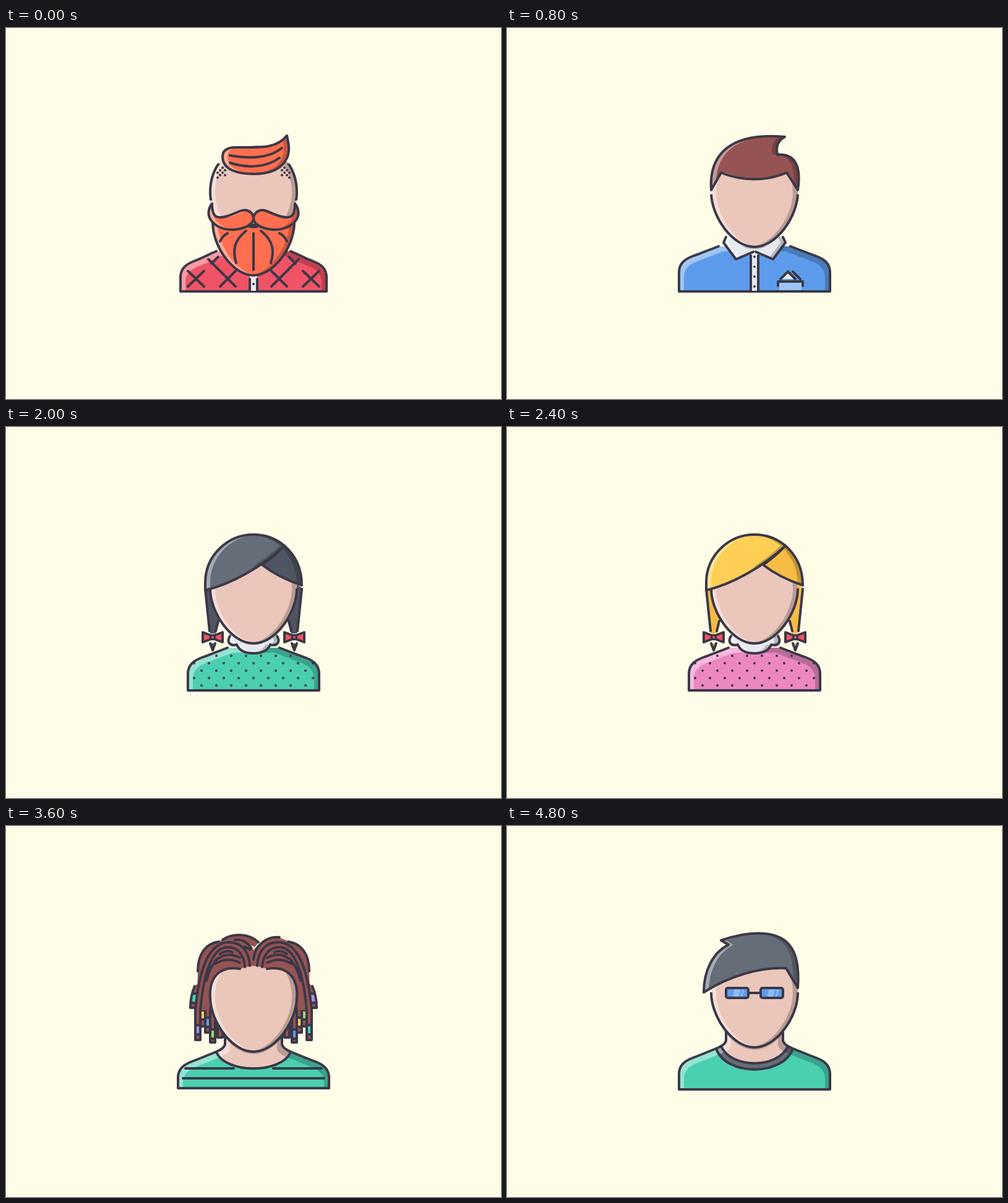
Recreate the animation shown at these times as an HTML page with a canvas. Size 800 by 600 pixels, loop 5000 ms.

```html
<!DOCTYPE html>
<html lang="en">
<head>
<meta charset="utf-8">
<title>Avatars</title>
<style>
  html, body { margin: 0; width: 100%; height: 100%; overflow: hidden; background: #fffde8; }
  canvas { display: block; }
</style>
</head>
<body>
<canvas id="stage" width="800" height="600"></canvas>
<script>
const ctx = document.getElementById('stage').getContext('2d');
const ink = '#3b3847', skin = '#eac6bb', white = '#e6e9ed', orange = '#ff6e4f',
  red = '#f15366', brown = '#965353', blue = '#5d9cec', yellow = '#ffce54',
  amber = '#f6bb42', mint = '#4acfb0', pink = '#ec87c0', grey = '#656d78',
  lilac = '#ac92ec', green = '#a0d468';

// ---- helpers; x = 0 is the vertical axis of the figure ----
const path = d => typeof d === 'string' ? new Path2D(d) : d;

function fill(d, color) {
  ctx.fillStyle = color;
  ctx.fill(path(d));
}

function line(d, width = 4, color = ink) {
  ctx.lineWidth = width;
  ctx.strokeStyle = color;
  ctx.stroke(path(d));
}

function dot(x, y, r = 2, color = ink) {
  ctx.beginPath();
  ctx.arc(x, y, r, 0, 7);
  ctx.fillStyle = color;
  ctx.fill();
}

function within(clip, draw) {
  ctx.save();
  ctx.clip(path(clip));
  draw();
  ctx.restore();
}

function both(draw) {
  for (const side of [1, -1]) {
    ctx.save();
    ctx.scale(side, 1);
    draw(side);
    ctx.restore();
  }
}

function twin(d) {
  const p = new Path2D(d);
  p.addPath(new Path2D(d), new DOMMatrix([-1, 0, 0, 1, 0, 0]));
  return p;
}

// Light rim on the left half, dark rim on the right half
function shade(p, dy = 0) {
  within(p, () => {
    for (const [side, color] of [[-1, 'rgba(255,255,255,.42)'], [1, 'rgba(0,0,0,.21)']]) {
      const rim = new Path2D('M-400 0H400V600H-400Z');
      rim.addPath(p, new DOMMatrix([1, 0, 0, 1, -8 * side, dy]));
      within(`M0 0H${400 * side}V600H0Z`, () => {
        ctx.fillStyle = color;
        ctx.fill(rim, 'evenodd');
      });
    }
  });
}

function shape(d, color, outline = d) {
  const p = path(d);
  fill(p, color);
  shade(p);
  line(outline);
}

// ---- shared parts ----
let torso;

function body(w, y, bottom, neck, color, open, paint = () => {}) {
  const n = neck + 14;
  const left = (open ? `M${-n} ${y - 42}`
    : `M${-neck} ${y - 75}V${y - 55}Q${-neck} ${y - 48} ${-n} ${y - 42}`) +
    `C${-n - 16} ${y - 35.6} ${38 - w} ${y - 32} ${22 - w} ${y - 26}` +
    `C${9 - w} ${y - 21} ${-w} ${y - 14} ${-w} ${y}`;
  const right = `V${y}C${w} ${y - 14} ${w - 9} ${y - 21} ${w - 22} ${y - 26}` +
    `C${w - 38} ${y - 32} ${n + 16} ${y - 35.6} ${n} ${y - 42}` +
    (open ? '' : `Q${neck} ${y - 48} ${neck} ${y - 55}V${y - 75}`);
  torso = new Path2D(`${left}V${bottom}H${w}${right}`);
  within(torso, () => {
    fill(torso, color);
    paint();
  });
  shade(torso, 8);
  line(torso);
}

const scoop = (x, y, dip) => `M${-x} ${y}C${16 - x} ${dip} ${x - 16} ${dip} ${x} ${y}`;

function tee(w, y, bottom, neck, color, x, top, dip, trim) {
  const outer = scoop(x, top, dip), inner = scoop(x - 8, top - 4, dip - 12);
  const up = 'V250H-90V350Z';
  body(w, y, bottom, neck, color, false, () => {
    fill(outer + up, trim || skin);
    if (trim) fill(inner + up, skin);
  });
  line(outer);
  if (trim) line(inner);
}

function head(chin, ...spans) {
  const s = chin - 88;
  const p = new Path2D(`M-70 ${s}C-70 ${s - 44} -40 ${s - 76} 0 ${s - 76}S70 ${s - 44} 70 ${s}` +
    `C70 ${s + 38} 36 ${chin} 0 ${chin}S-70 ${s + 38} -70 ${s}Z`);
  within(torso, () => {
    ctx.translate(0, 4);
    fill(p, 'rgba(0,0,0,.18)');
  });
  fill(p, skin);
  shade(p);
  for (const [a, b] of spans) within(`M-200 ${a}H200V${b}H-200Z`, () => line(p));
}

function moustache(dy, color) {
  ctx.save();
  ctx.translate(0, dy);
  shape(twin('M0 306C-3 295 -13 292 -24 297C-38 303 -52 309 -60 305C-66 302 -67 293 -67 284' +
    'C-72 290 -75 300 -70 309C-62 322 -46 327 -31 326C-14 325 1 317 0 306Z'), color);
  ctx.restore();
}

// ---- people ----
function bearded(hair, shirt) {
  body(118, 403, 426, 46, shirt, true);
  both(() => line('M-106 393L-80 418M-80 393L-106 418M-73 374L-29 418M-29 393L-54 418M-57 370L-68 381'));
  fill('M-6 398H6V425H-6Z', white);
  line('M-6 406V425M6 406V425');
  dot(0, 414);
  head(354, [219, 279]);
  both(() => {
    for (const [x, y] of [[50, 226], [54, 230], [46, 230], [58, 234], [50, 234], [54, 238], [46, 238], [58, 242]])
      dot(-x, y);
  });
  const jaw = 'M-66 314C-66 355 -32 400 0 400S66 355 66 314';
  shape(jaw + 'Z', hair, jaw);
  line('M0 332V391');
  both(() => line('M-12 328C-32 344 -34 360 -28 380M-42 332Q-50 336 -54 345'));
  fill('M-6 318L0 311L6 318Z', white);
  shape('M-10 320Q0 316 10 320Q0 324 -10 320Z', '#d6a6d8');
  moustache(0, hair);
  shape('M54 174C57 188 60 202 52 214C42 231 20 236 0 236C-24 236 -50 230 -50 208' +
    'C-50 198 -42 193 -28 193C10 193 36 196 54 174Z', hair);
  line('M-38 206C-5 212 26 210 46 194M-38 218C-10 227 20 226 42 210');
}

function clerk(hair, shirt) {
  body(122, 395, 426, 44, shirt, true);
  fill('M40 412H76V424H40Z', 'rgba(255,255,255,.4)');
  fill('M42 406L54 394L66 406Z', white);
  line('M42 406L54 394L66 406M62 394L74 406M38 417V410H78V417');
  fill('M-6 360H6V425H-6Z', white);
  line('M-6 368V425M6 368V425');
  for (let y = 370; y < 420; y += 16) dot(0, y);
  const collar = twin('M-46 338L-50 347L-30 374L0 360V336Z');
  fill(collar, white);
  shade(collar);
  both(() => line('M-46 338L-50 347L-30 374L-2 362'));
  head(354, [269, 360]);
  shape('M-70 262C-74 205 -40 168 49 176C38 182 34 192 37 205C60 203 77 216 70 262L52 234' +
    'C20 248 -20 248 -54 234Z', hair);
}

function bobbed(hair, shirt, trim) {
  tee(110, 404, 424, 38, shirt, 66, 371, 411, trim);
  head(353, [301, 360]);
  shape('M-54 199C-82 206 -94 236 -84 275C-80 295 -75 310 -70 322C-68 285 -62 250 -42 237Z', hair);
  shape('M-54 199C-36 169 40 165 66 206C90 240 84 290 66 333C64 300 56 233 -8 233' +
    'C-20 233 -32 235 -42 237Z', hair);
}

function braided(hair, dark, dress) {
  body(106, 399, 426, 28, dress, true);
  within(torso, () => {
    for (let row = 0; row < 5; row++)
      for (let x = -108 + row % 2 * 12; x < 110; x += 24) dot(x, 370 + row * 12);
  });
  shape('M-38 338C-44 348 -38 355 -27 352C-23 362 -12 366 0 366S23 362 27 352C38 355 44 348 38 338', white);
  both(() => {
    fill('M-78 260L-70 334H-61L-56 312C-66 298 -70 280 -70 255Z', dark);
    line('M-78 262L-71 330M-57 314L-61 330');
    fill('M-70 350L-66 362L-62 350Z', dark);
    line('M-70 350L-66 361L-62 350');
    const bow = 'M-82 332L-66 338L-50 332V348L-66 342L-82 348Z';
    fill(bow, red);
    line(bow);
    line('M-69 337H-63V343H-69Z');
    dot(-66, 340, 2, red);
  });
  head(350, [261, 356]);
  shape('M50 192C68 208 78 230 78 256C54 248 32 237 14 223C28 213 40 203 50 192Z', dark);
  shape('M-78 264V252C-78 208 -42 174 0 174C20 174 37 181 50 192C14 226 -36 254 -78 264Z', hair);
}

function dreaded(hair, shirt) {
  tee(122, 407, 424, 46, shirt, 60, 366, 401);
  both(() => line('M-110 392H-32'));
  line('M-114 408H114');
  // x, bottom edge, bead top, left bead, right bead
  const locks = [[54, 342], [66, 350, 329, green, blue], [74, 334, 310, blue, yellow],
    [82, 324, 298, yellow, green], [90, 346, 322, lilac, mint]];
  both(side => {
    fill('M-94 258L-102 294H-92L-84 250Z', hair);
    fill('M-99 271L-102 286H-94L-93 271Z', side > 0 ? mint : lilac);
    line('M-95 259C-99 268 -102 280 -102 294H-95M-99 271H-94M-102 286H-95');
    for (const [x, bottom, bead, left, right] of locks) {
      const strand = `M${4 - x} 240L${-x - 4} 300V${bottom}H${4 - x}V300L${12 - x} 240`;
      fill(strand, hair);
      if (bead) {
        const box = `M${-x - 4} ${bead}H${4 - x}V${bead + 15}H${-x - 4}Z`;
        fill(box, side > 0 ? left : right);
        line(box);
      }
      line(strand);
    }
  });
  head(365, [276, 372]);
  both(() => {
    fill('M1 226L-12 228L-22 231C-50 226 -70 244 -70 275L-76 298H-92L-90 235' +
      'C-90 205 -76 190 -56 187C-40 176 -16 178 1 202Z', hair);
    line('M-90 235C-90 205 -76 190 -56 187M-94 300C-90 250 -78 188 -40 188C-18 188 -7 204 -6 226' +
      'M-86 300C-82 244 -68 196 -42 196C-24 196 -15 210 -14 228' +
      'M-76 250C-72 234 -66 222 -58 214M-70 280C-73 240 -50 226 -22 231' +
      'M-62 223Q-44 211 -22 221M-56 214Q-42 203 -22 213M-54 207Q-44 200 -34 204');
  });
  fill('M-50 185C-34 172 -8 172 8 188L2 196L-14 188Z', hair);
  line('M-50 184C-34 173 -8 173 8 188M0 216C2 192 22 178 42 180M-30 184Q-14 182 -3 198M-14 195L-6 200');
}

function strongman(hair, vest) {
  const neckline = 'V380C-58 399 -34 406 0 406S58 399 58 380V';
  body(122, 382, 426, 46, skin, false, () => {
    fill('M-78 300H78V430H-78Z', vest);
    fill(`M-58 290${neckline}290Z`, skin);
  });
  line(`M-78 349V425M78 349V425M-58 340${neckline}340`);
  head(338, [170, 251], [300, 344]);
  moustache(-27, hair);
}

function glasses(hair, shirt, trim) {
  tee(122, 401, 426, 46, shirt, 62, 360, 405, trim);
  head(358, [269, 364]);
  shape('M-82 269C-82 235 -68 205 -42 192L-54 185C0 166 40 172 56 192C70 208 72 235 70 262' +
    'L51 230C10 228 -40 242 -82 269Z', hair);
  for (const x of [-46, 10]) {
    const lens = new Path2D();
    lens.roundRect(x, 262, 36, 16, 3);
    fill(lens, blue);
    fill(`M${x + 14} 262H${x + 24}L${x + 20} 278H${x + 10}ZM${x + 27} 262H${x + 30}L${x + 26} 278H${x + 23}Z`,
      'rgba(255,255,255,.3)');
    line(lens);
  }
  line('M-9 270H9');
}

const cast = [
  [bearded, orange, red],
  [glasses, brown, yellow, white],
  [braided, orange, red, mint],
  [braided, brown, '#7f4444', yellow],
  [clerk, brown, blue],
  [braided, grey, '#4f5661', pink],
  [bobbed, yellow, mint, white],
  [bobbed, orange, yellow, white],
  [braided, brown, '#7f4444', blue],
  [braided, orange, red, yellow],
  [braided, grey, '#4f5661', mint],
  [bobbed, brown, pink, white],
  [braided, yellow, amber, pink],
  [clerk, grey, red],
  [glasses, orange, blue, white],
  [bearded, brown, mint],
  [clerk, orange, yellow],
  [bearded, grey, blue],
  [dreaded, brown, mint],
  [bearded, yellow, red],
  [clerk, yellow, mint],
  [strongman, red, yellow],
  [dreaded, grey, red],
  [glasses, brown, blue, white],
  [glasses, grey, mint, grey]
];

ctx.lineCap = ctx.lineJoin = 'round';

function frame(now) {
  ctx.fillStyle = '#fffde8';
  ctx.fillRect(0, 0, 800, 600);
  ctx.save();
  ctx.translate(400, 0);
  const [draw, ...colors] = cast[Math.floor(now % 5000 / 200)];
  draw(...colors);
  ctx.restore();
  requestAnimationFrame(frame);
}
frame(performance.now());
</script>
</body>
</html>
```
